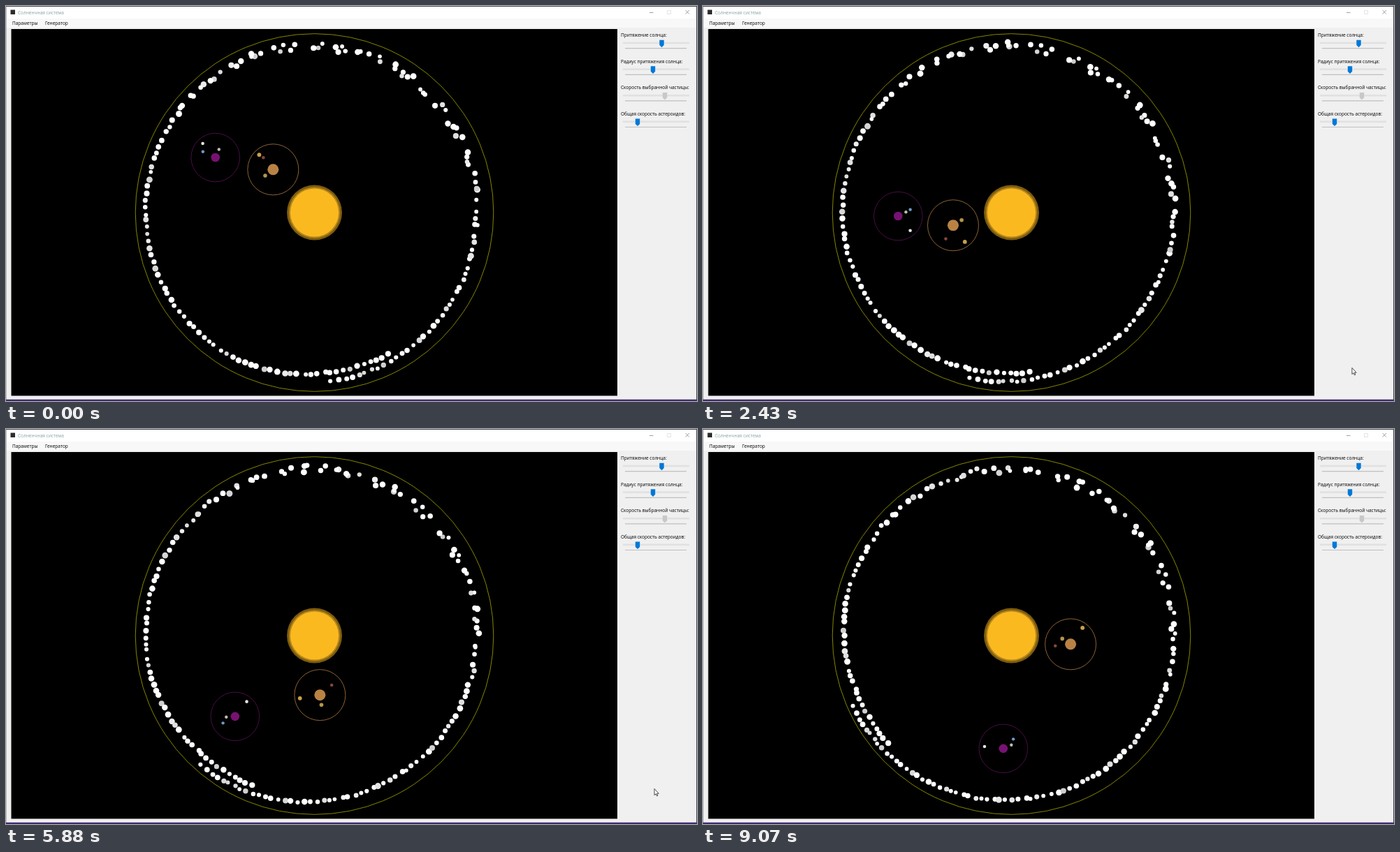
An HTML page with a canvas that plays this animation: 989x566 px, repeating every 9140 ms.

```html
<!DOCTYPE html>
<html lang="ru">
<head>
<meta charset="utf-8">
<title>Солненчная система</title>
<style>
  html, body { margin: 0; width: 100%; height: 100%; overflow: hidden; background: #f0f0f0; }
  canvas, svg { position: absolute; left: 0; top: 0; display: block; }
  text { font-family: "Open Sans", "Noto Sans", sans-serif; font-size: 6.5px; fill: #000; }
</style>
</head>
<body>
<canvas id="space" width="989" height="566"></canvas>
<svg id="ui" width="989" height="566" viewBox="0 0 989 566">
  <path fill="#fff" d="M0 1H989V18H0Z"/>
  <path fill="#f8f8f8" d="M0 18H989V31H0Z"/>
  <path fill="#4a4a50" d="M0 0H989V1H0ZM988 0H989V566H988Z"/>
  <path fill="#a5a5aa" d="M0 1H.7V566H0Z"/>
  <path fill="#432c74" d="M0 563.7H989V566H0Z"/>
  <rect x="6.5" y="5.5" width="6.5" height="6.5" fill="#2c2c2c"/>
  <text x="17" y="11.5" style="fill:#86a3a3">Солненчная система</text>
  <text x="9" y="27">Параметры</text>
  <text x="56" y="27">Генератор</text>
  <g fill="none" stroke-width=".8">
    <path stroke="#888" d="M921 9.5H926.5M972.5 6L978 11.5M978 6L972.5 11.5"/>
    <path stroke="#ddd" d="M946.5 6.5H951.5V11.5H946.5Z"/>
  </g>
  <g id="sliders"></g>
  <path id="cursor" fill="#fff" stroke="#222" stroke-width=".8" d="M0 0V9.2L2.1 7.3L3.5 10.4L4.9 9.8L3.5 6.8H6.2Z"/>
</svg>
<script>
const LOOP = 9140, STEP = 67.69, LAST_STEP = 134;
const SUN = { x: 441.5, y: 296 };
const RAD = Math.PI / 180;
const sin = deg => Math.sin(deg * RAD), cos = deg => Math.cos(deg * RAD);
const clamp01 = v => Math.max(0, Math.min(1, v));
const ctx = document.getElementById('space').getContext('2d');
const cursor = document.getElementById('cursor');

const sliders = [
  { label: 'Притяжение солнца:', x: 938.5 },
  { label: 'Радиус притяжения солнца:', x: 926 },
  { label: 'Скорость выбранной частицы:', x: 943, disabled: true },
  { label: 'Общая скорость астероидов:', x: 904 }
];
document.getElementById('sliders').innerHTML = sliders.map(({ label, x, disabled }, i) => {
  const y = 44 + 37.6 * i;
  return `
    <text x="880" y="${y}">${label}</text>
    <rect x="883" y="${y + 7.7}" width="95" height="2.6" fill="#e1e1e1"/>
    <path d="M886 ${y + 16.7}H974" stroke="#c0c0c0" stroke-width="1.2"/>
    <path d="M${x - 3.2} ${y + 4.7}h6.4v7.4l-3.2 3.2l-3.2 -3.2z" fill="${disabled ? '#c8c8c8' : '#0078d7'}"/>`;
}).join('');

// Angles in degrees, counter-clockwise from the right; rates per step
const planets = [
  { r: 85.5, angle: 133.8, rate: 1.626, size: 8, halo: 36.5, color: '#b98245', line: '#b07c40', moons: [
    { r: 29, angle: 133.4, rate: 4.78, size: 2.9, color: '#c9a04a' },
    { r: 22, angle: 129.5, rate: 3.11, size: 2.3, color: '#864638' },
    { r: 14.3, angle: 217.5, rate: 4.84, size: 2.8, color: '#b3964a' }] },
  { r: 162.3, angle: 150.9, rate: 0.858, size: 6.3, halo: 34.8, color: '#771273', line: '#5c1259', moons: [
    { r: 27, angle: 132, rate: -5.06, size: 2.3, color: '#e6e2e2' },
    { r: 19.7, angle: 155, rate: -3.52, size: 2.2, color: '#6c9ac8' },
    { r: 12.6, angle: 66, rate: -11.06, size: 2.2, color: '#bcc0ae' }] }
];

const noise = n => { const v = Math.sin(n * 12.9898 + 4.1) * 43758.5453; return v - Math.floor(v); };

// One long stream of asteroids: its head runs outside its own tail end
const asteroids = Array.from({ length: 161 }, (_, i) => {
  const head = clamp01(1 - i / 30), tail = clamp01((i - 138) / 12);
  const shade = noise(i + 500);
  const grey = shade > 0.22 ? 255 : Math.round(205 + shade * 160);
  return {
    angle: 84.2 - 2.385 * i,
    rate: 0.575 - 0.029 * head,
    offset: 8 * head - 5 * tail,
    lift: noise(i) - 0.5,
    slip: noise(i + 900) - 0.5,
    size: 2.8 + 1.7 * noise(i + 200),
    color: `rgb(${grey},${grey},${grey})`
  };
});

function disc(x, y, r, color) {
  ctx.fillStyle = color;
  ctx.beginPath();
  ctx.arc(x, y, r, 0, 2 * Math.PI);
  ctx.fill();
}
function ring(x, y, r, color) {
  ctx.strokeStyle = color;
  ctx.lineWidth = 0.8;
  ctx.beginPath();
  ctx.arc(x, y, r, 0, 2 * Math.PI);
  ctx.stroke();
}
const orbit = (centre, body, n) => {
  const a = body.angle + body.rate * n;
  return { x: centre.x + body.r * cos(a), y: centre.y - body.r * sin(a) };
};

function drawAsteroid(a, n) {
  // Clockwise, slightly elliptical: faster and nearer to the sun on the right
  const mean = a.angle + a.rate * n;
  const path = mean + 2.9 * (sin(mean) - sin(a.angle));
  // The paths cross below and fan out above
  const spread = 0.2 + 0.8 * Math.max(0, cos(path + 65));
  const angle = path + 6 * a.slip * spread;
  const r = 237 - 5 * cos(angle - 20) + a.offset + 12 * a.lift * spread;
  disc(SUN.x + r * cos(angle), SUN.y + r * sin(angle), a.size, a.color);
}

function drawPlanet(p, n) {
  const pos = orbit(SUN, p, n);
  ring(pos.x, pos.y, p.halo, p.line);
  disc(pos.x, pos.y, p.size, p.color);
  for (const m of p.moons) {
    const at = orbit(pos, m, n);
    disc(at.x, at.y, m.size, m.color);
  }
}

// The pointer enters from the lower right, rests, and leaves the same way
function moveCursor(t) {
  const away = 1 - clamp01((t - 400) / 470);
  const settle = clamp01((t - 1400) / 1900);
  const leave = Math.max(0, t - 8200) / 340;
  const x = 930 - 2 * settle + 60 * away + 21 * leave;
  const y = 522 - 6.5 * settle + 48 * away + 39 * leave;
  cursor.setAttribute('transform', `translate(${x} ${y})`);
}

function draw(now) {
  const n = Math.min(LAST_STEP, Math.floor((now % LOOP) / STEP + 0.3));
  ctx.fillStyle = '#f0f0f0';
  ctx.fillRect(0, 0, 989, 566);
  ctx.fillStyle = '#000';
  ctx.fillRect(7.5, 33, 867.5, 525.5);
  ring(SUN.x, SUN.y, 256.3, '#a8a800');
  disc(SUN.x, SUN.y, 39.5, '#7d5c10');
  disc(SUN.x, SUN.y, 36.6, '#b58618');
  disc(SUN.x, SUN.y, 34.6, '#fbb920');
  asteroids.forEach(a => drawAsteroid(a, n));
  planets.forEach(p => drawPlanet(p, n));
  moveCursor(n * STEP);
}

const start = performance.now();
(function tick() {
  draw(performance.now() - start);
  requestAnimationFrame(tick);
})();
</script>
</body>
</html>
```
